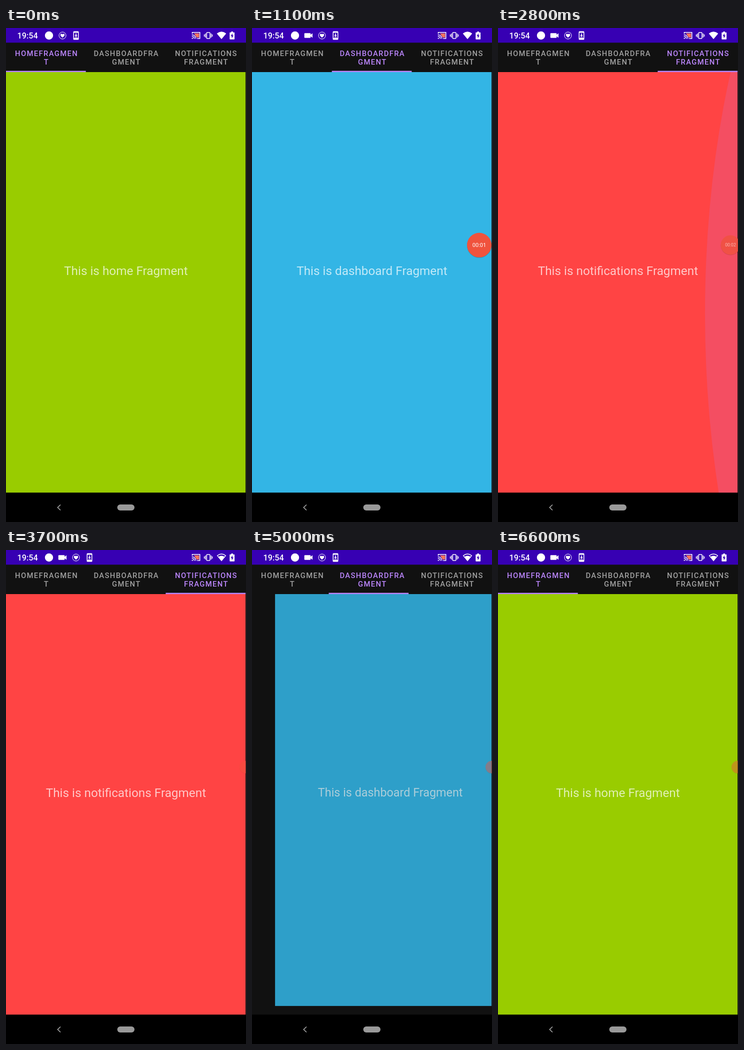
Write an HTML page that moves like this. It is 480 px wide and 986 px high and loops after 7000 ms.

```html
<!DOCTYPE html>
<html lang="en">
<head>
<meta charset="utf-8">
<title>Swiping tabs</title>
<style>
  html, body { margin: 0; width: 100%; height: 100%; overflow: hidden; background: #000; }
  svg { display: block; width: 100vw; height: 100vh; font-family: Roboto, "Noto Sans", sans-serif; }
  .tab { font-size: 14.85px; font-weight: 500; letter-spacing: 1.33px; text-anchor: middle; }
  .label { font-size: 24.3px; fill: #fff; fill-opacity: .7; text-anchor: middle; }
</style>
</head>
<body>
<svg viewBox="0 0 480 986" preserveAspectRatio="none">
  <defs>
    <clipPath id="pagerClip"><rect y="88" width="479" height="839.6"/></clipPath>
  </defs>
  <rect width="480" height="986"/>
  <rect y="29" width="480" height="898.4" fill="#111"/>

  <g clip-path="url(#pagerClip)">
    <g id="pages"></g>
    <g fill="#bb86fc" fill-opacity=".16">
      <ellipse id="glowRight" cy="570"/>
      <ellipse id="glowLeft" cy="570"/>
    </g>
  </g>

  <g id="tabs"></g>
  <rect id="indicator" y="85.500" width="159.700" height="2.500" fill="#bb86fc"/>

  <rect width="480" height="29.3" fill="#3700b3"/>
  <g fill="#fff">
    <text x="22.5" y="21" font-size="16.2" font-weight="500">19:54</text>
    <circle cx="86" cy="15" r="8.2"/>
    <path id="camera" d="M106 10.3h10q1.3 0 1.3 1.3v2l3.7-3v8.800l-3.700-3v2q0 1.300-1.300 1.300h-10q-1.300 0-1.300-1.300v-6.800q0-1.300 1.300-1.300z"/>
    <g id="notices">
      <circle cx="113" cy="15" r="7" fill="none" stroke="#fff"/>
      <path d="M113 19.300C110 16.800 108.800 15.600 108.800 13.800C108.800 11.400 111.800 10.800 113 12.900C114.200 10.800 117.200 11.400 117.200 13.800C117.200 15.600 116 16.800 113 19.300z"/>
      <rect x="134.500" y="6.500" width="11" height="17" rx="1.500"/>
      <path fill="#3700b3" d="M136 9.500h8v10.500h-8z"/>
      <path d="M139.200 11h1.600v3.500h2.200l-3 3.200l-3-3.200h2.200zM137 18.200h6v1h-6z"/>
    </g>

    <path fill="#f4745c" d="M376 10.700h10.300v8.300h-5z"/>
    <g fill="none" stroke="#fff" stroke-width="1.500">
      <path d="M372.500 11.500V8.800h15.200v12.200h-5.500"/>
      <path d="M371.700 13.500a8 8 0 0 1 8 8M371.700 16.500a5 5 0 0 1 5 5"/>
      <rect x="401.300" y="9" width="6.600" height="12" rx="1"/>
      <path d="M398.900 11v8M410.300 11v8M396.600 12.800v4.400M412.600 12.800v4.400"/>
    </g>
    <circle cx="372.800" cy="20.600" r="1.200"/>
    <path id="wifiFull" d="M431 22.300L421.600 11Q431 3.600 440.400 11z"/>
    <g id="wifiLow">
      <path d="M431 21.300L422.600 11.200Q431 4.800 439.400 11.200z" fill="none" stroke="#fff" stroke-width="1.400"/>
      <path d="M431 22L424.400 13.900Q431 9.200 437.600 13.900z"/>
    </g>
    <path d="M450.500 7h3.400v1.700h2.300q.9 0 .9.900v12.200q0 .9-.9.900h-8q-.9 0-.9-.9V9.600q0-.9.900-.9h2.300z"/>
    <path fill="#3700b3" d="M453 10.700l-3.600 5.500h2.200v4.300l3.500-5.700h-2.100z"/>
  </g>

  <path d="M109 951.500l-5.700 5.500l5.700 5.500" fill="none" stroke="#aaa" stroke-width="1.600"/>
  <rect x="222.500" y="951" width="34.500" height="12" rx="6" fill="#999"/>

  <g id="bubble">
    <g id="disc">
      <circle cy="1" r="24.500" fill-opacity=".2"/>
      <circle r="24.500" fill="#f0533d"/>
    </g>
    <text id="timer" y="4" font-size="11" fill="#fff" text-anchor="middle"></text>
  </g>
</svg>
<script>
const DURATION = 7000, STEP = 100;
const WIDTH = 479, HEIGHT = 898, TOP = 29.6, TAB = 159.7;
const MIN_SCALE = 0.85, MIN_ALPHA = 0.5;
const GLOW_RADIUS = HEIGHT * 1.2, GLOW_ARC = GLOW_RADIUS * (1 - Math.cos(Math.PI / 6));

const el = id => document.getElementById(id);

function add(parent, tag, attrs, text = "") {
  const node = document.createElementNS("http://www.w3.org/2000/svg", tag);
  for (const name in attrs) node.setAttribute(name, attrs[name]);
  node.textContent = text;
  return parent.appendChild(node);
}

const show = (node, visible) => node.setAttribute("visibility", visible ? "visible" : "hidden");

// Linear interpolation through [time, value] keys.
function track(keys, t) {
  const i = keys.findIndex(key => key[0] > t);
  if (i === 0) return keys[0][1];
  if (i < 0) return keys[keys.length - 1][1];
  const [t0, v0] = keys[i - 1], [t1, v1] = keys[i];
  return v0 + (v1 - v0) * (t - t0) / (t1 - t0);
}

// Each swipe: start time, starting page, direction, progress per step.
const swipes = [
  [300, 0, 1, [0, .06, .2, .48, .766, .9, .965, .99, 1]],
  [1500, 1, 1, [0, .06, .4, .62, .756, .9, .965, .99, 1]],
  [3900, 2, -1, [0, .08, .4, .695, .9, .98, 1]],
  [4900, 1, -1, [0, .039, .25, .55, .8, .93, .985, 1]]
];
const scrollKeys = swipes.flatMap(([start, page, dir, progress]) =>
  progress.map((p, i) => [start + i * STEP, page + dir * p]));

const rightGlow = [[2700, 0], [2800, 65], [3100, 69], [3200, 69], [3300, 50], [3400, 32], [3500, 17], [3600, 6], [3700, 0]];
const leftGlow = [[5900, 0], [6000, 30], [6200, 62], [6300, 42], [6400, 22], [6500, 8], [6600, 0]];
const bubbleHide = [[2700, 0], [2800, .42], [2900, .75], [3000, .95], [3100, 1]];

const pages = [["home", "#99cc00"], ["dashboard", "#33b5e5"], ["notifications", "#ff4444"]]
  .map(([name, fill]) => {
    const group = add(el("pages"), "g", {});
    add(group, "rect", { width: WIDTH, height: HEIGHT, fill });
    add(group, "text", { class: "label", x: WIDTH / 2 + .4, y: 463.4 }, `This is ${name} Fragment`);
    return group;
  });

const tabs = [["HOMEFRAGMEN", "T"], ["DASHBOARDFRA", "GMENT"], ["NOTIFICATIONS", "FRAGMENT"]]
  .map((lines, i) => {
    const group = add(el("tabs"), "g", {});
    lines.forEach((line, row) =>
      add(group, "text", { class: "tab", x: TAB * (i + .5) + 1.2, y: 55.6 + row * 17.4 }, line));
    return group;
  });

// Zoom-out page effect: shrink, fade and shift pages away from the centre.
function placePage(page, offset) {
  const scale = Math.max(MIN_SCALE, 1 - Math.abs(offset));
  const marginX = WIDTH * (1 - scale) / 2, marginY = HEIGHT * (1 - scale) / 2;
  const shift = marginX + (offset < 0 ? -1 : 1) * marginY / 2;
  const alpha = MIN_ALPHA + (scale - MIN_SCALE) / (1 - MIN_SCALE) * (1 - MIN_ALPHA);
  show(page, Math.abs(offset) < 1);
  page.setAttribute("opacity", alpha);
  page.setAttribute("transform",
    `translate(${offset * WIDTH + marginX + shift} ${TOP + marginY}) scale(${scale})`);
}

function placeGlow(glow, depth, edge, side) {
  const rx = GLOW_RADIUS * depth / GLOW_ARC;
  glow.setAttribute("rx", rx);
  glow.setAttribute("ry", GLOW_RADIUS);
  glow.setAttribute("cx", edge + side * (rx - depth));
  show(glow, depth > 0);
}

function render(t) {
  const scroll = track(scrollKeys, t);
  pages.forEach((page, i) => placePage(page, i - scroll));

  // The highlighted tab changes once the swipe passes halfway.
  const selected = Math.round(scroll);
  tabs.forEach((tab, i) => tab.setAttribute("fill", i === selected ? "#bb86fc" : "#a0a0a0"));
  el("indicator").setAttribute("x", scroll * TAB);

  placeGlow(el("glowRight"), track(rightGlow, t), WIDTH, 1);
  placeGlow(el("glowLeft"), track(leftGlow, t), 0, -1);

  const recording = t >= 100;
  show(el("camera"), recording);
  el("notices").setAttribute("transform", `translate(${recording ? 27 : 0} 0)`);
  show(el("wifiFull"), t < 3500);
  show(el("wifiLow"), t >= 3500);

  const hide = track(bubbleHide, t);
  show(el("bubble"), recording);
  el("bubble").setAttribute("transform", `translate(${454.5 + 25 * hide} 433.3) scale(${1 - .49 * hide})`);
  el("disc").setAttribute("opacity", 1 - .56 * hide);
  el("timer").setAttribute("opacity", 1 - hide);
  el("timer").textContent = "00:0" + (t < 1100 ? 0 : t < 2100 ? 1 : 2);
}

const start = performance.now();
function tick() {
  const t = (performance.now() - start) % DURATION;
  render(Math.floor(t / STEP) * STEP);
  requestAnimationFrame(tick);
}
tick();
</script>
</body>
</html>
```
